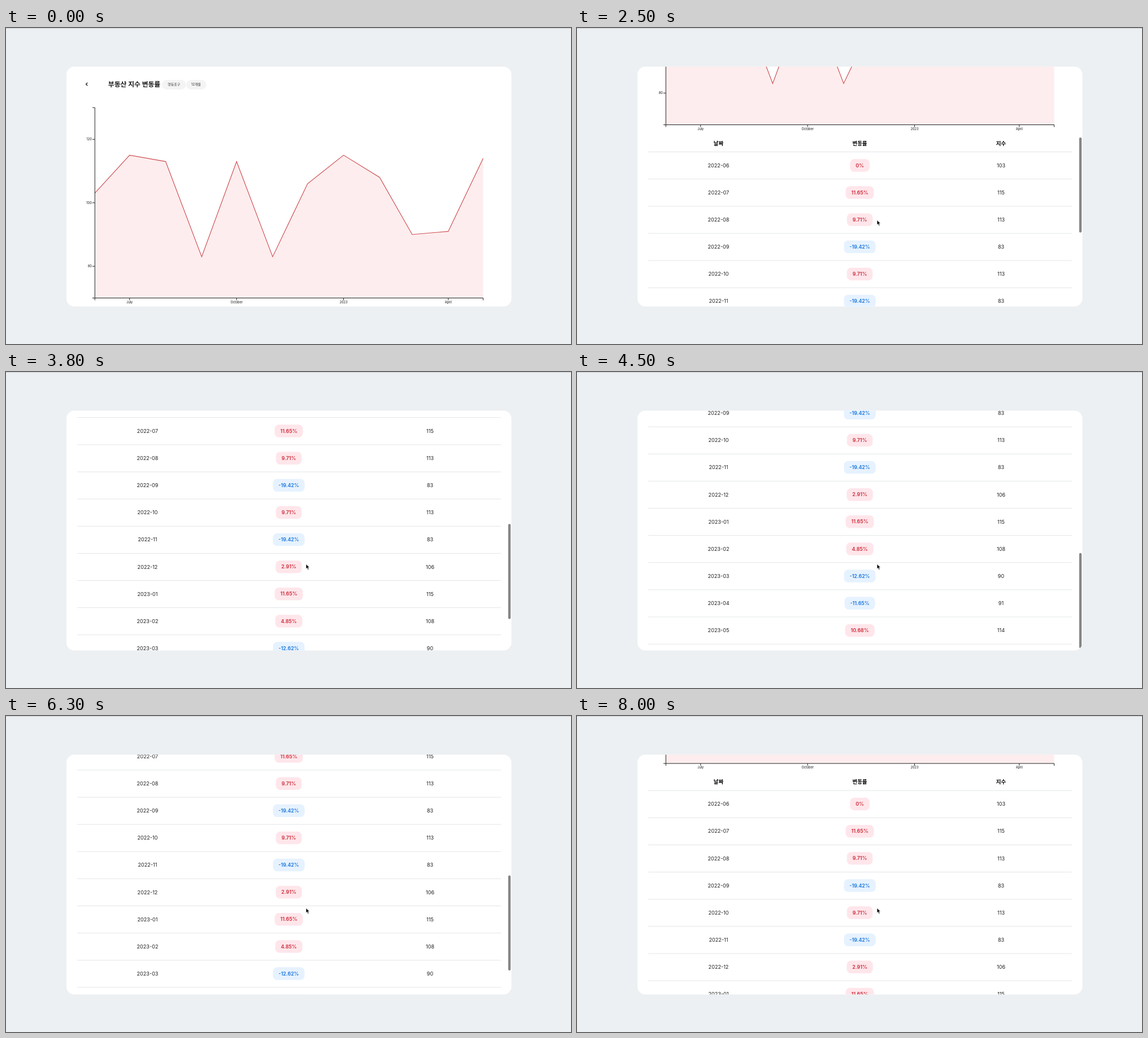
An HTML page that plays this animation: 1000 by 560 pixels, repeating every 8.37 s.

```html
<!DOCTYPE html>
<html lang="ko">
<head>
<meta charset="utf-8">
<style>
html, body { margin: 0; width: 100%; height: 100%; overflow: hidden; background: #ecf0f3; }
svg { display: block; width: 1000px; height: 560px; }
text { font-family: Inter, "Noto Sans CJK KR", "Noto Sans CJK", sans-serif; font-size: 9.1px; text-anchor: middle; fill: #222; }
.title { font-size: 11.8px; font-weight: 700; text-anchor: start; fill: #1a1a1a; }
.tag { font-size: 6px; fill: #333; }
.tick { font-size: 5.6px; fill: #111; }
.head { font-size: 9.4px; font-weight: 700; fill: #000; }
.rate { font-size: 8.7px; font-weight: 700; }
.axis { fill: none; stroke: #222; stroke-width: 1; }
</style>
</head>
<body>
<svg viewBox="0 0 1000 560">
  <defs><clipPath id="card"><rect x="107" y="68.5" width="787.5" height="425" rx="14"/></clipPath></defs>
  <rect width="1000" height="1" fill="#c9ced3"/>
  <rect x="107" y="68.5" width="787.5" height="425" rx="14" fill="#fff"/>
  <g clip-path="url(#card)">
    <g id="page"></g>
    <rect id="bar" x="888.8" width="4.4" height="168.5" rx="2.2" fill="#868686"/>
  </g>
  <path id="cursor" d="M531 340.4v8.6l2-1.8 1.4 3.2 1.6-.7-1.4-3.1h2.7z" fill="#000" stroke="#fff" stroke-width=".7"/>
</svg>
<script>
const LOOP = 8370, STEP = 100;
const values = [103, 115, 113, 83, 113, 83, 106, 115, 108, 90, 91, 114];
const start = Date.UTC(2022, 5), end = Date.UTC(2023, 4);
const LEFT = 157, RIGHT = 844.5, TOP = 141, BASE = 478.5;
const x = i => LEFT + (RIGHT - LEFT) * (Date.UTC(2022, 5 + i) - start) / (end - start);
const y = v => BASE - (v - 70) * (BASE - TOP) / 60;
const $ = id => document.getElementById(id);

const text = (cx, cy, str, cls = "", extra = "") =>
  `<text x="${cx}" y="${cy}" dy=".365em" class="${cls}" ${extra}>${str}</text>`;
const box = (left, top, w, h, r, fill) =>
  `<rect x="${left}" y="${top}" width="${w}" height="${h}" rx="${r}" fill="${fill}"/>`;

function header() {
  return `<path d="M144.3 96.9l-2.7 2.7 2.7 2.7" fill="none" stroke="#111" stroke-width="1.3"/>`
    + text(180.8, 99.6, "부동산 지수 변동률", "title")
    + box(276, 92, 42.5, 17, 8.5, "#f4f4f5") + text(297.2, 100.3, "영등포구", "tag")
    + box(319, 92, 35.5, 17, 8.5, "#f4f4f5") + text(336.3, 100.3, "12개월", "tag");
}

function chart() {
  const line = values.map((v, i) => `${x(i)},${y(v)}`).join(" ");
  let out = `<polygon points="${LEFT},${BASE} ${line} ${RIGHT},${BASE}" fill="#feedee"/>`
    + `<polyline points="${line}" fill="none" stroke="#cd4b50" stroke-width="1.15"/>`
    + `<path class="axis" d="M153 ${TOP}H157.3V${BASE}H153M157.3 482.5V${BASE}H${RIGHT}V482.5"/>`;
  for (const v of [80, 100, 120])
    out += `<path class="axis" d="M153 ${y(v)}h4"/>` + text(151.7, y(v), v, "tick", 'style="text-anchor:end"');
  for (const [i, name] of [[1, "July"], [4, "October"], [7, "2023"], [10, "April"]])
    out += `<path class="axis" d="M${x(i)} ${BASE}v4"/>` + text(x(i), 485.8, name, "tick");
  return out;
}

function hover() {
  const px = x(6), py = y(106);
  return `<g id="hover"><path d="M${px} ${TOP - 1}V${BASE}" stroke="#ccc" stroke-width="1.4"/>`
    + box(px - 62.5, py - 31.7, 62.5, 31.5, 3, "#6f6f6f")
    + text(px - 29.8, py - 16.2, "106", "", 'style="fill:#fff;font-weight:700;font-size:9.6px"')
    + `<circle cx="${px}" cy="${py}" r="2" fill="#000"/></g>`;
}

function table() {
  const rowH = 48.13, cols = [250.5, 500.5, 750.5];
  const rule = n => box(126, 526.1 + n * rowH, 750, 1, 0, "#e3e5e7");
  let out = ["날짜", "변동률", "지수"].map((s, i) => text(cols[i], 511.4, s, "head")).join("") + rule(0);
  values.forEach((v, i) => {
    const cy = 550.4 + i * rowH;
    const date = new Date(Date.UTC(2022, 5 + i)).toISOString().slice(0, 7);
    const rate = +((v / values[0] - 1) * 100).toFixed(2);
    const color = rate < 0 ? "#2a80e0" : "#d03a46";
    out += text(cols[0], cy, date)
      + box(cols[1], cy - 11.2, 0, 22.5, 7.5, rate < 0 ? "#e6f2ff" : "#ffe6eb")
      + text(cols[1], cy, rate + "%", "rate", `style="fill:${color}"`)
      + text(cols[2], cy, v) + rule(i + 1);
  });
  return out;
}

$("page").innerHTML = header() + chart() + hover() + table();

// Fit each badge around its label
for (const label of document.querySelectorAll(".rate")) {
  const w = label.getComputedTextLength() + 20, badge = label.previousElementSibling;
  badge.setAttribute("width", w);
  badge.setAttribute("x", 500.5 - w / 2);
}

// Scroll offsets as [ms, px]
const scroll = [
  [1400, 0], [1500, 8], [1600, 42], [1700, 88.7], [1900, 188], [2100, 260], [2300, 297], [2500, 307],
  [2600, 307], [2700, 313], [2900, 350], [3100, 376], [3200, 376], [3300, 384], [3500, 422], [3800, 494],
  [4100, 566], [4300, 602], [4500, 622], [4700, 630], [5700, 630], [5800, 627], [6000, 597], [6300, 527],
  [6600, 470], [6800, 443], [7000, 415], [7200, 398], [7300, 394.4]
];
function offset(t) {
  const n = scroll.findIndex(k => k[0] >= t);
  if (n === 0) return 0;
  if (n < 0) return scroll[scroll.length - 1][1];
  const [t0, a] = scroll[n - 1], [t1, b] = scroll[n];
  return a + (b - a) * (t - t0) / (t1 - t0);
}
function barOpacity(t) {
  if (t < 1500 || t >= 8000 || (t >= 5400 && t < 5800)) return 0;
  return t === 5300 || t === 7900 ? 0.5 : 1;
}

function draw() {
  const t = Math.floor(performance.now() % LOOP / STEP) * STEP;
  const s = offset(t);
  $("page").setAttribute("transform", `translate(0 ${-s})`);
  $("bar").setAttribute("y", 70.4 + s * 0.4025);
  $("bar").setAttribute("opacity", barOpacity(t));
  $("cursor").setAttribute("visibility", t >= 1100 ? "visible" : "hidden");
  $("hover").setAttribute("visibility", t >= 1100 && BASE - s > 341 ? "visible" : "hidden");
  requestAnimationFrame(draw);
}
draw();
</script>
</body>
</html>
```
